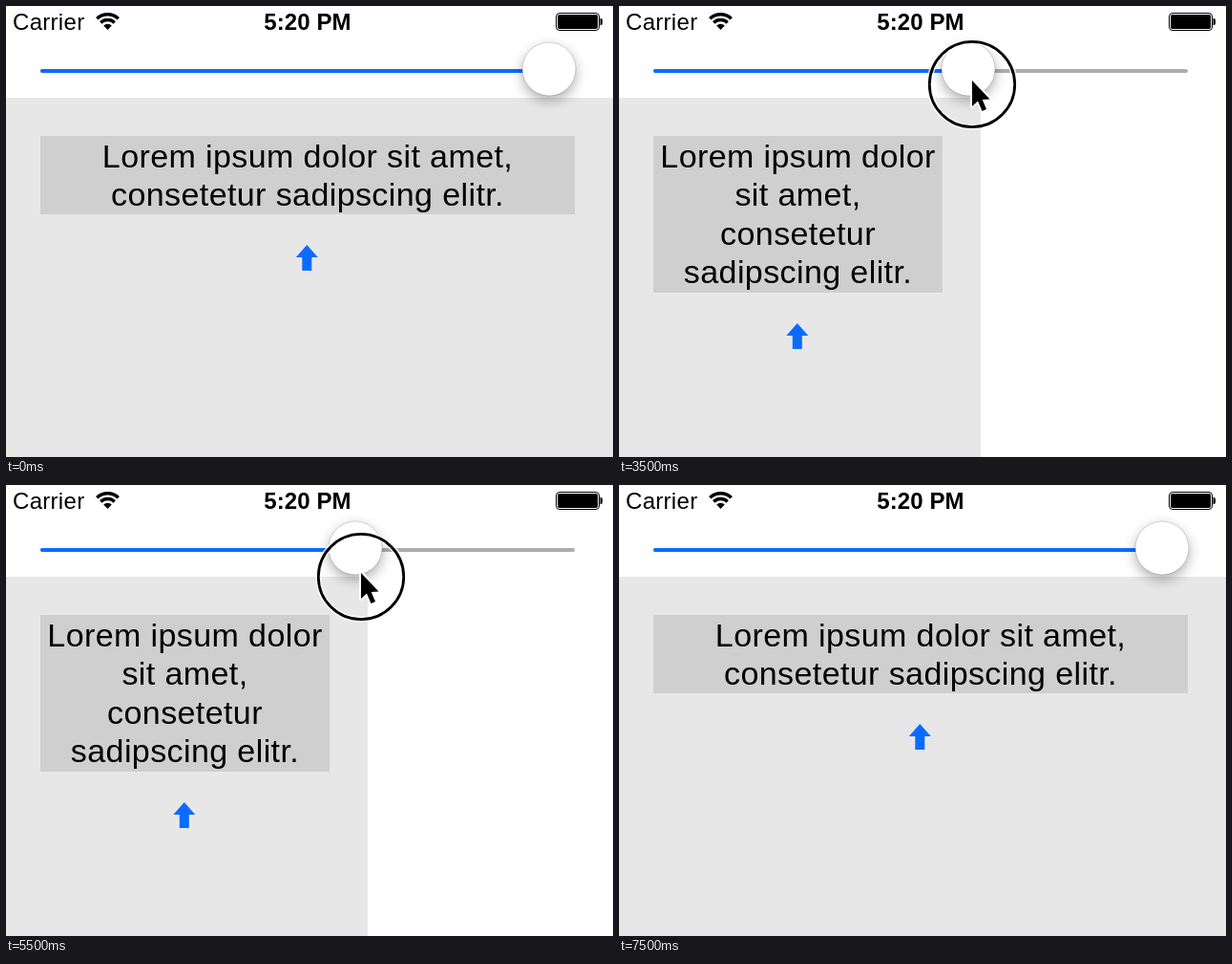
An HTML page with a canvas that plays this animation: 636 px wide and 472 px high, repeating every 8.6 s.

```html
<!DOCTYPE html>
<html lang="en">
<head>
<meta charset="utf-8">
<title>Label wrapping with a slider</title>
<style>
  html, body { margin: 0; width: 100%; height: 100%; overflow: hidden; background: #fff; }
  canvas { display: block; }
</style>
</head>
<body>
<canvas id="stage" width="636" height="472"></canvas>
<script>
const W = 636, H = 472, LOOP = 8600, STEP = 100;
const BLUE = '#0a6cff', FONT = '"Liberation Sans", Arial, sans-serif';
const WORDS = 'Lorem ipsum dolor sit amet, consetetur sadipscing elitr.'.split(' ');
const ctx = document.getElementById('stage').getContext('2d');

// Each track is a list of [time, value].
const THUMB = [[1900, 569], [2100, 565], [2400, 541], [2700, 511], [3500, 366], [4200, 236], [4400, 235],
  [4800, 235], [5500, 366], [5600, 392], [6400, 547.5], [6600, 564], [6700, 569]];
const CURSOR_X = [[1500, 684], [1600, 666], [1900, 606], [2100, 594], [2400, 567], [2700, 534], [3500, 370],
  [4200, 227], [4400, 226], [4800, 226], [5500, 372], [5600, 401], [6400, 580], [6600, 616], [6900, 678]];
const CURSOR_Y = [[1500, 84], [1900, 68], [2400, 69], [2700, 72], [3500, 82], [4400, 92],
  [4800, 92], [5500, 96], [6400, 80], [6900, 85]];

// Monotone cubic interpolation.
function sample(track, t) {
  const last = track.length - 1;
  if (t <= track[0][0]) return track[0][1];
  if (t >= track[last][0]) return track[last][1];
  const slope = i => (track[i + 1][1] - track[i][1]) / (track[i + 1][0] - track[i][0]);
  const tangent = i => {
    if (i === 0 || i === last) return 0;
    const a = slope(i - 1), b = slope(i);
    return a * b > 0 ? 2 * a * b / (a + b) : 0;
  };
  let i = 0;
  while (t >= track[i + 1][0]) i++;
  const [t0, a] = track[i], [t1, b] = track[i + 1];
  const d = t1 - t0, u = (t - t0) / d, v = 1 - u;
  return a * v * v * (1 + 2 * u) + b * u * u * (3 - 2 * u)
    + d * u * v * (v * tangent(i) - u * tangent(i + 1));
}

function rect(color, x, y, w, h) {
  ctx.fillStyle = color;
  ctx.fillRect(x, y, w, h);
}

function pill(x, y, w, h, r) {
  ctx.beginPath();
  ctx.roundRect(x, y, w, h, r);
}

function polygon(points, x, y) {
  ctx.beginPath();
  points.forEach(([px, py]) => ctx.lineTo(x + px, y + py));
  ctx.closePath();
}

function setType(font, spacing, align) {
  ctx.font = font + ' ' + FONT;
  ctx.letterSpacing = spacing + 'px';
  ctx.textAlign = align;
  ctx.fillStyle = '#000';
}

// Wraps at words; a word wider than the label breaks between letters.
function wrap(width) {
  const fits = s => ctx.measureText(s).width <= width;
  const lines = [];
  let line = '';
  for (let word of WORDS) {
    const joined = line ? line + ' ' + word : word;
    if (fits(joined)) { line = joined; continue; }
    if (line) lines.push(line);
    while (!fits(word)) {
      let n = word.length - 1;
      while (n > 1 && !fits(word.slice(0, n))) n--;
      lines.push(word.slice(0, n));
      word = word.slice(n);
    }
    line = word;
  }
  lines.push(line);
  return lines;
}

function drawStatusBar() {
  setType('24px', 0.3, 'left');
  ctx.fillText('Carrier', 7, 25);
  setType('bold 24px', 0.1, 'center');
  ctx.fillText('5:20 PM', 316, 25);

  const wx = 106.5, wy = 25, a = -Math.PI / 2, spread = 0.76;
  ctx.strokeStyle = '#000';
  ctx.lineWidth = 3.5;
  for (const r of [16.3, 10.5]) {
    ctx.beginPath();
    ctx.arc(wx, wy, r, a - spread, a + spread);
    ctx.stroke();
  }
  ctx.beginPath();
  ctx.moveTo(wx, wy);
  ctx.arc(wx, wy, 6.2, a - spread, a + spread);
  ctx.fill();

  ctx.lineWidth = 1;
  pill(576.5, 7.5, 45, 18, 3.5);
  ctx.stroke();
  pill(578, 9, 42, 15, 2);
  ctx.fill();
  pill(622.5, 13, 2.5, 7, [0, 2, 2, 0]);
  ctx.fill();
}

function drawPanel(width) {
  rect('#e7e7e7', 0, 96, width, H - 96);
  const boxW = width - 76, mid = 36 + boxW / 2;
  setType('34px', 0.4, 'center');
  const lines = wrap(boxW);
  const boxH = 2 * Math.ceil(20.3 * lines.length);
  rect('#cfcfcf', 36, 136, boxW, boxH);
  ctx.fillStyle = '#000';
  lines.forEach((s, i) => ctx.fillText(s, mid, Math.round(169 + 40.45 * i)));

  ctx.fillStyle = BLUE;
  polygon([[0, 0], [11.5, 13], [5, 13], [5, 27], [-5, 27], [-5, 13], [-11.5, 13]],
    mid - 0.7, 136 + boxH + 32);
  ctx.fill();
}

function drawSlider(x) {
  ctx.fillStyle = '#adadad';
  pill(36, 66, 560, 4, 2);
  ctx.fill();
  ctx.fillStyle = BLUE;
  pill(36, 66, x - 36, 4, 2);
  ctx.fill();

  ctx.save();
  ctx.beginPath();
  ctx.arc(x, 66, 28, 0, 2 * Math.PI);
  ctx.shadowColor = 'rgba(0,0,0,0.32)';
  ctx.shadowBlur = 13;
  ctx.shadowOffsetY = 5;
  ctx.fillStyle = '#fff';
  ctx.fill();
  ctx.restore();
  ctx.strokeStyle = 'rgba(0,0,0,0.16)';
  ctx.lineWidth = 1;
  ctx.stroke();
}

function drawCursor(x, y) {
  const ring = (color, width) => {
    ctx.beginPath();
    ctx.arc(x, y, 44.7, 0, 2 * Math.PI);
    ctx.strokeStyle = color;
    ctx.lineWidth = width;
    ctx.stroke();
  };
  ring('rgba(255,255,255,0.75)', 6);
  ring('#000', 2.8);

  polygon([[0, 0], [0, 27], [6, 21.5], [10.5, 32], [15, 30], [10.7, 20], [18.5, 19.5]], x, y - 4);
  ctx.lineJoin = 'round';
  ctx.strokeStyle = '#fff';
  ctx.lineWidth = 4;
  ctx.stroke();
  ctx.fillStyle = '#000';
  ctx.fill();
}

function draw(t) {
  const thumb = sample(THUMB, t);
  rect('#fff', 0, 0, W, H);
  drawPanel(Math.round(213 + (thumb - 235) * 423 / 334));
  drawStatusBar();
  drawSlider(thumb);
  if (t >= 1600 && t < 7500) drawCursor(sample(CURSOR_X, t), sample(CURSOR_Y, t));
}

const start = performance.now();
function tick() {
  const t = (performance.now() - start) % LOOP;
  draw(Math.floor(t / STEP) * STEP);
  requestAnimationFrame(tick);
}
tick();
</script>
</body>
</html>
```
